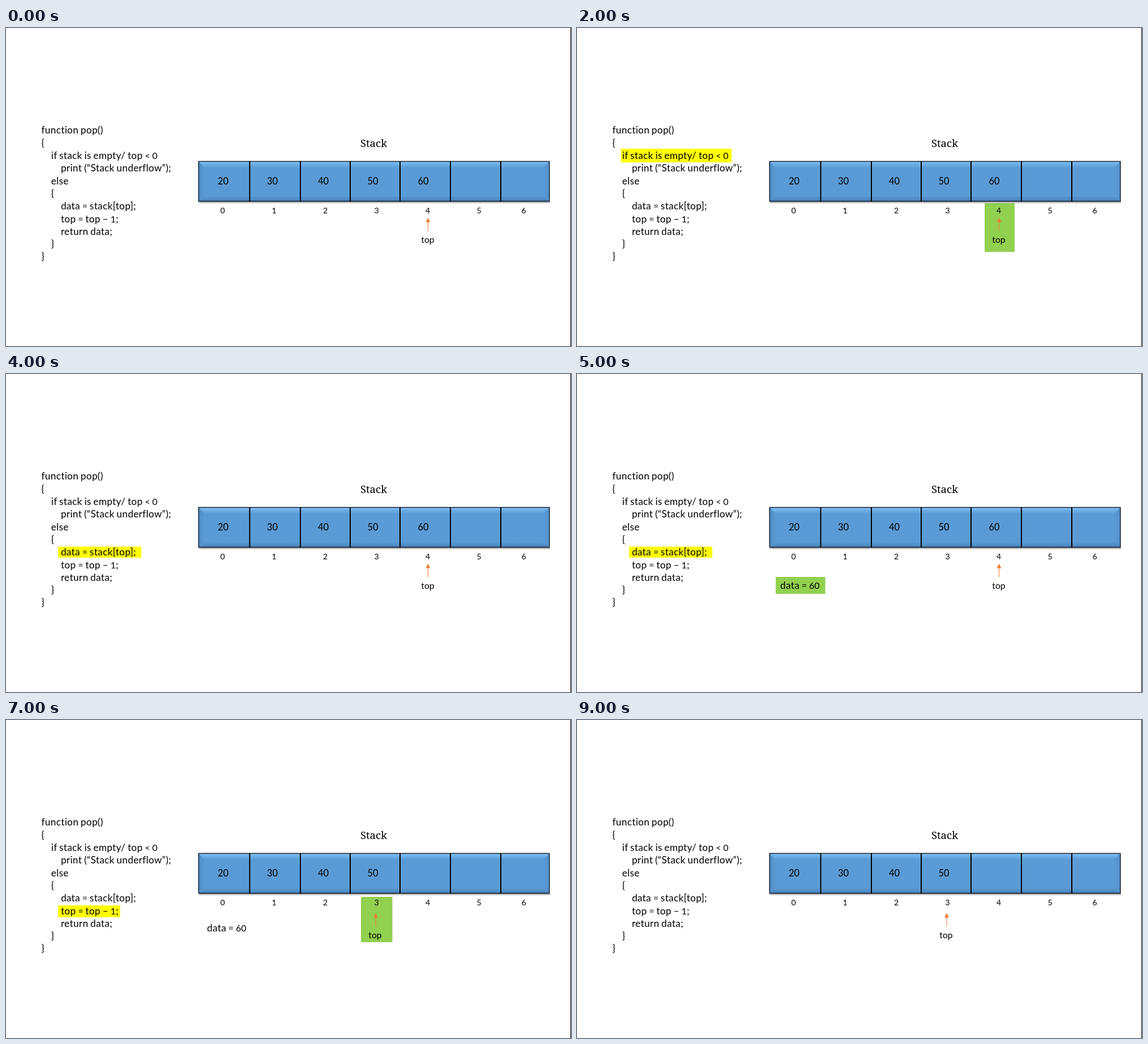
Recreate the animation shown at these times as an HTML page. Size 998 by 561 pixels, loop 10 s.

```html
<!DOCTYPE html>
<html lang="en">
<head>
<meta charset="utf-8">
<title>Stack pop</title>
<style>
  html, body { margin: 0; width: 100%; height: 100%; overflow: hidden; background: #fff; }
  svg { display: block; width: 100vw; height: 100vh; }
  text { font-family: Lato, "Open Sans", sans-serif; fill: #000; white-space: pre; }
  .code { font-size: 17.2px; letter-spacing: .32px; word-spacing: -.95px; }
  .code .symbol { font-size: 16px; letter-spacing: .1px; }
  .value { font-size: 16.4px; text-anchor: middle; }
  .index { font-size: 14px; text-anchor: middle; }
  .label { font-size: 15.8px; text-anchor: middle; }
  .title { font: 18.6px "Noto Serif", serif; text-anchor: middle; }
</style>
</head>
<body>
<svg id="stage" viewBox="0 0 998 561">
  <defs>
    <linearGradient id="topBevel" x2="0" y2="1">
      <stop offset="0" stop-color="#8ac6f6"/>
      <stop offset=".4" stop-color="#70b0e8"/>
      <stop offset="1" stop-color="#5b9bd5"/>
    </linearGradient>
    <linearGradient id="leftBevel">
      <stop offset="0" stop-color="#4d8bc4"/>
      <stop offset="1" stop-color="#5b9bd5"/>
    </linearGradient>
    <linearGradient id="rightBevel">
      <stop offset="0" stop-color="#5b9bd5"/>
      <stop offset="1" stop-color="#508fc9"/>
    </linearGradient>
    <linearGradient id="bottomBevel" x2="0" y2="1">
      <stop offset="0" stop-color="#5b9bd5"/>
      <stop offset="1" stop-color="#4882b9"/>
    </linearGradient>
    <linearGradient id="shadow" x2="0" y2="1">
      <stop offset="0" stop-color="#000" stop-opacity=".45"/>
      <stop offset="1" stop-color="#000" stop-opacity="0"/>
    </linearGradient>
  </defs>
</svg>
<script>
const stage = document.getElementById('stage');

function add(tag, attrs, content, parent = stage) {
  const node = document.createElementNS('http://www.w3.org/2000/svg', tag);
  for (const key in attrs) node.setAttribute(key, attrs[key]);
  if (content !== undefined) node.textContent = content;
  parent.appendChild(node);
  return node;
}
const rect = (x, y, right, bottom, fill) =>
  add('rect', { x, y, width: right - x, height: bottom - y, fill });
const text = (kind, x, y, content) => add('text', { class: kind, x, y }, content);
const path = (d, fill) => add('path', { d, fill });

// Digits and operators are set slightly smaller than the letters
function code(x, y, line) {
  const node = text('code', x, y);
  for (const part of line.split(/([\d<=]+)/)) {
    if (part) add('tspan', { class: /[\d<=]/.test(part) ? 'symbol' : 'word' }, part, node);
  }
  return node;
}

const YELLOW = '#ffff00', GREEN = '#92d050', ORANGE = '#ed7d31';

rect(0, 0, 998, 561, '#fff');
rect(997, 0, 998, 561, '#000');

const marks = {
  test: rect(77.5, 213, 273, 237, YELLOW),
  other: rect(76, 259, 115, 284.5, YELLOW),
  read: rect(92, 304.5, 239, 324, YELLOW),
  move: rect(92, 327, 201.5, 348, YELLOW),
  give: rect(91.5, 350, 191.5, 370, YELLOW),
  topFour: rect(720, 309, 773, 395, GREEN),
  topThree: rect(627, 312, 682.5, 392, GREEN),
  result: rect(351, 358, 438.5, 388, GREEN)
};

[
  [0, 'function pop()'],
  [0, '{'],
  [1, 'if stack is empty/ top < 0'],
  [2, 'print (“Stack underflow”);'],
  [1, 'else'],
  [1, '{'],
  [2, 'data = stack[top];'],
  [2, 'top = top – 1;'],
  [2, 'return data;'],
  [1, '}'],
  [0, '}']
].forEach(([depth, line], i) => code(62.5 + 17.2 * depth, 186.4 + 22.3 * i, line));

text('title', 649.5, 210, 'Stack');

// Bevelled bar with its soft shadow
rect(341, 306, 961, 310, 'url(#shadow)');
rect(340, 235, 960, 306, '#5b9bd5');
path('M340 235H960L949 247H351Z', 'url(#topBevel)');
path('M340 306H960L949 296H351Z', 'url(#bottomBevel)');
path('M340 235L351 247V296L340 306Z', 'url(#leftBevel)');
path('M960 235L949 247V296L960 306Z', 'url(#rightBevel)');
add('rect', { x: 340.2, y: 235.4, width: 619.6, height: 70.2, fill: 'none', stroke: '#14202e', 'stroke-width': 1.5 });
for (const x of [430.5, 520, 608, 696, 785, 874]) rect(x - 1, 235, x + 1, 306, '#000');

const values = [383.5, 470.5, 560.5, 648, 737].map((x, i) => text('value', x, 276, 20 + 10 * i));
[382.5, 473.5, 564, 654.5, 745, 835.5, 914.5].forEach((x, i) => text('index', x, 327, i));

function pointer(x, y, labelX) {
  return [
    rect(x - .5, y + 7, x + .5, y + 24, ORANGE),
    path(`M${x} ${y}l3.9 8h-7.8Z`, ORANGE),
    text('label', labelX, y + 44, 'top')
  ];
}
const atFour = pointer(745.5, 334.5, 745);
const atThree = pointer(653, 340.5, 652);

const dataText = code(359, 379, 'data = 60');
const movedData = code(355, 373.3, 'data = 60');
const sumText = code(359, 401.3, 'top = 4 – 1 = 3');

// Highlights shown in each second of the loop
const steps = [
  [], ['test'], ['test', 'topFour'], ['other'], ['read'],
  ['read', 'result'], ['move'], ['move', 'topThree'], ['give'], []
];

function show(node, on) {
  node.setAttribute('visibility', on ? 'visible' : 'hidden');
}

function render(ms) {
  const step = Math.floor(ms / 1000) % steps.length;
  const popped = step >= 7;
  for (const name in marks) show(marks[name], steps[step].includes(name));
  show(values[4], !popped);
  atFour.forEach(node => show(node, !popped));
  atThree.forEach(node => show(node, popped));
  show(dataText, step === 5 || step === 6);
  show(movedData, step === 7 || step === 8);
  show(sumText, step === 6);
}

const start = performance.now();
function tick() {
  render(performance.now() - start);
  requestAnimationFrame(tick);
}
tick();
</script>
</body>
</html>
```
